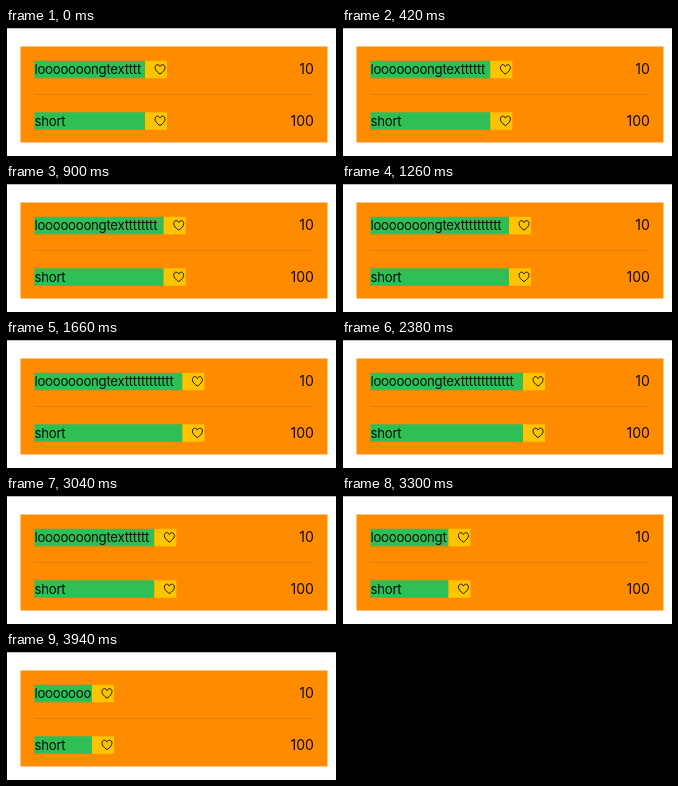
An HTML page for the animation above (4000 ms loop, 330 px wide and 128 px high).

```html
<!DOCTYPE html>
<html lang="en">
<head>
<meta charset="utf-8">
<title>Growing label</title>
<style>
  html, body { margin: 0; width: 100%; height: 100%; overflow: hidden; background: #fff; }
  svg { display: block; }
  text { font: 13.2px Inter, Roboto, sans-serif; letter-spacing: -.25px; fill: #0b0b0b; }
  .count { font-size: 14px; letter-spacing: 0; text-anchor: end; }
  .label { fill: #2fbf55; }
  .badge { fill: #ffc400; }
  .heart { fill: none; stroke: #1c1600; stroke-width: 1; stroke-linejoin: round; }
</style>
</head>
<body>
<svg width="330" height="128" viewBox="0 0 330 128">
  <path fill="#bdbdbd" d="M0 0H330V1H0z"/>
  <path d="M0 0H1V128H0z"/>
  <path fill="#ff8b00" d="M14.5 18.5H321.5V114.5H14.5z"/>
  <path fill="#e37e10" d="M28.5 66H308V67H28.5z"/>
  <g id="rows"></g>
</svg>
<script>
const LOOP = 4000, LEFT = 28.5;
const FULL = 'looooooongtex' + 't'.repeat(13);
const ADVANCE = { l: 3.3, o: 7.74, n: 7.9, g: 7.9, t: 4.67, e: 7.1, x: 6.8 };

const row = (y, label, count) => `<g transform="translate(0 ${y})">
  <rect class="label" x="${LEFT}" y="-8.5" height="17.5"/>
  <g class="tail">
    <rect class="badge" y="-8.5" width="22" height="17.5"/>
    <path class="heart" d="M15 4.8C12 2.8 10 .6 10-1.7C10-5.2 13.9-5.6 15-2.7C16.1-5.6 20-5.2 20-1.7C20 .6 18 2.8 15 4.8z"/>
  </g>
  <text x="${LEFT}" y="4.8">${label}</text>
  <text class="count" x="307.8" y="4.8">${count}</text>
</g>`;

const rows = document.getElementById('rows');
rows.innerHTML = row(41.3, '', 10) + row(92.8, 'short', 100);
const typed = rows.querySelector('text');
const labels = rows.querySelectorAll('.label');
const tails = rows.querySelectorAll('.tail');

// Steady typing, a pause, then a held delete key.
function lengthAt(t) {
  if (t < 2830) return Math.min(FULL.length, 17 + Math.floor(t / 205));
  return Math.max(8, FULL.length - 1 - Math.floor((t - 2830) / 32.5));
}

function draw(t) {
  const text = FULL.slice(0, lengthAt(t));
  const width = [...text].reduce((sum, c) => sum + ADVANCE[c], 0);
  typed.textContent = text;
  labels.forEach(el => el.setAttribute('width', width));
  tails.forEach(el => el.setAttribute('transform', `translate(${LEFT + width} 0)`));
}

const start = performance.now();
function tick() {
  draw((performance.now() - start) % LOOP);
  requestAnimationFrame(tick);
}
tick();
</script>
</body>
</html>
```
